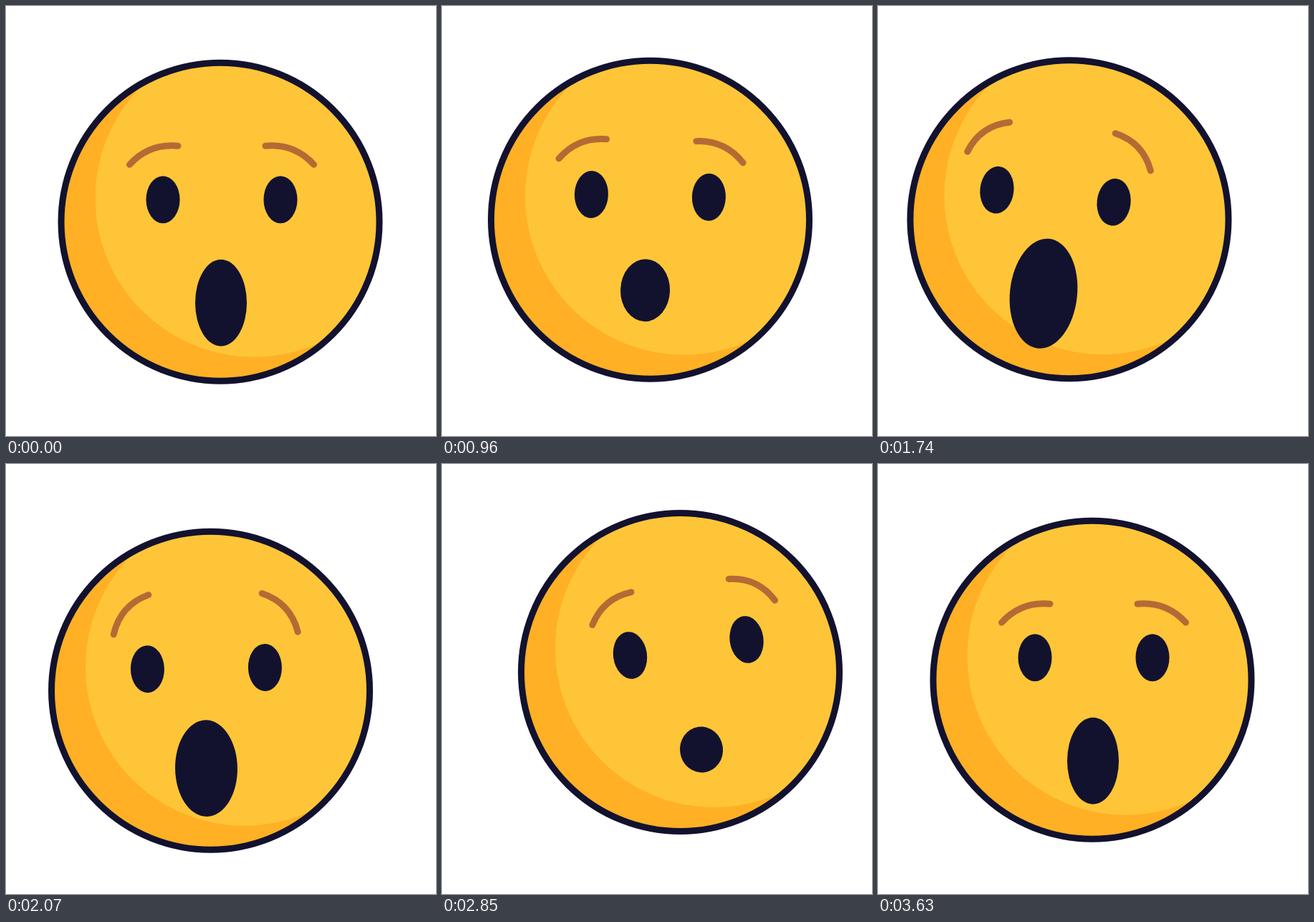
An HTML page with a canvas for the animation above (6.66 s loop, 600x600 px).

```html
<!DOCTYPE html>
<html lang="en">
<head>
<meta charset="utf-8">
<title>Surprised face</title>
<style>
  html, body { margin: 0; width: 100%; height: 100%; overflow: hidden; background: #fff; }
  canvas { display: block; width: 100%; height: 100%; }
</style>
</head>
<body>
<canvas id="stage" width="600" height="600"></canvas>
<script>
const ctx = document.getElementById('stage').getContext('2d');
const LOOP = 6660, STEP = 30, REST = 3630;
const INK = '#12122f', LIGHT = '#ffc538', SHADE = '#ffb024', BROW = '#b56a35';

// Smooth curve through [time, value] keys that never overshoots them.
function track(...keys) {
  const secant = i => (keys[i + 1][1] - keys[i][1]) / (keys[i + 1][0] - keys[i][0]);
  const slopes = keys.map((_, i) => {
    if (i === 0 || i === keys.length - 1) return 0;
    const a = secant(i - 1), b = secant(i);
    return a * b <= 0 ? 0 : 2 * a * b / (a + b);
  });
  return t => {
    if (t <= keys[0][0]) return keys[0][1];
    const i = keys.findIndex(k => k[0] > t) - 1;
    if (i < 0) return keys[keys.length - 1][1];
    const [t0, v0] = keys[i], [t1, v1] = keys[i + 1];
    const h = t1 - t0, u = (t - t0) / h, w = 1 - u;
    return v0 * (1 + 2 * u) * w * w + v1 * u * u * (3 - 2 * u)
      + h * u * w * (slopes[i] * w - slopes[i + 1] * u);
  };
}

// Head offset from its resting place
const headX = track([510, 0], [690, -1], [960, -8.5], [1380, -31], [1600, -33.5], [1740, -32],
  [2070, -13.5], [2370, 15.5], [2760, 32.5], [2850, 33.5], [3150, 17], [3450, 0.4], [REST, 0]);
const headY = track([0, 0], [240, 30], [490, -19], [690, -15], [960, -3], [1200, 1.5], [1610, -7],
  [1740, -3.5], [2070, 15], [2210, 18.5], [2370, 13.5], [2760, -9], [2850, -10.7],
  [3150, -0.5], [3450, 3.5], [REST, 0]);

// Facial features: point between the eyes, relative to the head, and tilt in degrees
const lookX = track([510, 2], [960, -0.1], [1610, -20.5], [1740, -19.5], [2370, 6.25],
  [2850, 11.25], [REST, 2]);
const lookY = track([510, -31], [960, -33.4], [1740, -32.5], [2370, -30.25], [2850, -34.5], [REST, -31]);
const tilt = track([600, 0], [960, 1.33], [1640, 6.2], [1740, 5.95], [2370, -7.2], [2560, -8.1],
  [2850, -7.7], [REST, 0]);

const eyeH = track([120, 33], [320, 4], [480, 19.5], [610, 33]);
const browLift = track([0, 0], [480, -0.1], [960, 0.09], [1740, 0.715], [2210, 1.03], [2370, 1],
  [2850, 0.42], [3540, 0]);
const mouthX = track([0, -1], [480, -4], [960, -3.8], [1740, -2.3], [2370, -1.5], [2850, -1]);
const mouthY = track([0, 144], [480, 131], [960, 132], [1740, 137], [2370, 141.7], [2850, 143.7], [REST, 144]);
const mouthW = track([0, 36], [490, 28.5], [960, 34.5], [1700, 47], [2370, 38.5], [2850, 30], [REST, 36]);
const mouthH = track([0, 60.5], [490, 28.5], [960, 43.5], [1700, 77], [2370, 54], [2850, 32], [REST, 60.5]);

function oval(x, y, rx, ry, color) {
  ctx.beginPath();
  ctx.ellipse(x, y, rx, ry, 0, 0, Math.PI * 2);
  ctx.fillStyle = color;
  ctx.fill();
}

function drawHead() {
  oval(0, 0, 222, 222, SHADE);
  ctx.save();
  ctx.clip();
  oval(47, -33, 221.5, 221.5, LIGHT);
  ctx.restore();
  ctx.beginPath();
  ctx.arc(0, 0, 222, 0, Math.PI * 2);
  ctx.lineWidth = 9;
  ctx.strokeStyle = INK;
  ctx.stroke();
}

function drawBrow(side, lift) {
  const outX = 128.5, outY = -49;
  const inX = 61 + 18.5 * Math.max(lift, 0), inY = -75 - 29 * lift;
  const dx = outX - inX, dy = outY - inY, len = Math.hypot(dx, dy);
  const bulge = 18 + 2 * lift;
  const midX = (outX + inX) / 2 + dy / len * bulge;
  const midY = (outY + inY) / 2 - dx / len * bulge;
  ctx.beginPath();
  ctx.moveTo(side * outX, outY);
  ctx.quadraticCurveTo(side * midX, midY, side * inX, inY);
  ctx.lineWidth = 9;
  ctx.lineCap = 'round';
  ctx.strokeStyle = BROW;
  ctx.stroke();
}

function draw(t) {
  ctx.fillStyle = '#fff';
  ctx.fillRect(0, 0, 600, 600);
  ctx.save();
  ctx.translate(299 + headX(t), 301.2 + headY(t));
  drawHead();
  ctx.translate(lookX(t), lookY(t));
  ctx.rotate(tilt(t) * Math.PI / 180);
  for (const side of [-1, 1]) {
    oval(side * 82, 0, 23.5, eyeH(t), INK);
    drawBrow(side, browLift(t));
  }
  oval(mouthX(t), mouthY(t), mouthW(t), mouthH(t), INK);
  ctx.restore();
}

const start = performance.now();
function tick() {
  const t = (performance.now() - start) % LOOP;
  draw(Math.min(Math.floor(t / STEP) * STEP, REST));
  requestAnimationFrame(tick);
}
tick();
</script>
</body>
</html>
```
